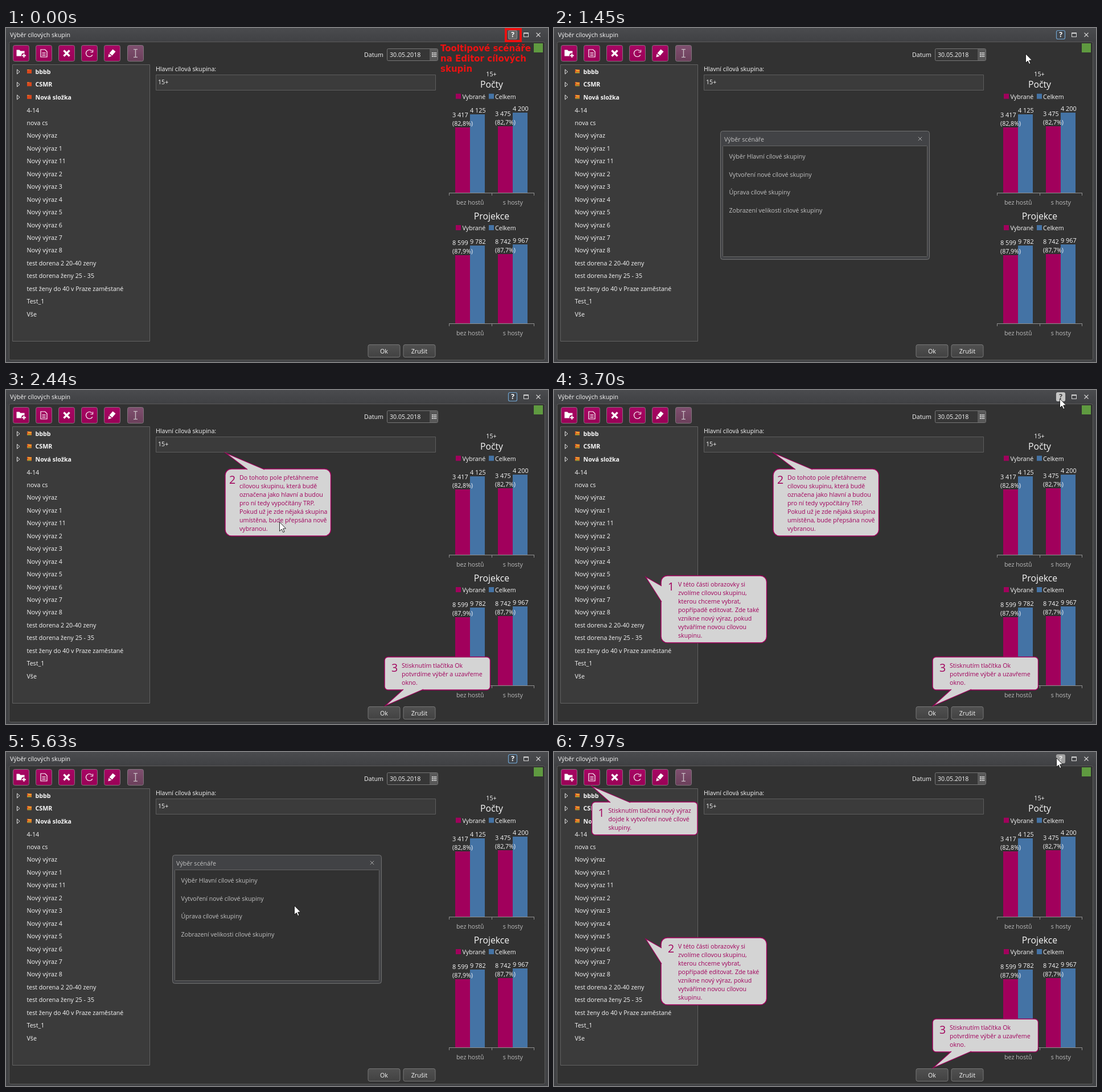
These frames come from a looping animation (952 px wide and 588 px high, 8 s). An HTML page with a canvas:

```html
<!DOCTYPE html>
<html lang="cs">
<head>
<meta charset="utf-8">
<title>Výběr cílových skupin</title>
<style>
html, body { margin: 0; width: 100%; height: 100%; overflow: hidden; background: #323232; }
canvas { display: block; width: 952px; height: 588px; }
</style>
</head>
<body>
<canvas id="stage" width="952" height="588"></canvas>
<script>
const ctx = document.getElementById('stage').getContext('2d');
const LOOP = 8000, STEP = 77;
const PINK = '#a1005c', BLUE = '#4473a5', RED = '#ed1111', TEXT = '#f8f8f8', DIM = '#c2c2c2';
const SANS = '"Open Sans", "Noto Sans", sans-serif';
const BODY = 10.65;

const clamp = v => Math.max(0, Math.min(1, v));

function text(str, x, y, { size = BODY, color = TEXT, weight = 400, align = 'left', family = SANS } = {}) {
  ctx.font = `${weight} ${size}px ${family}`;
  ctx.fillStyle = color;
  ctx.textAlign = align;
  ctx.fillText(str, x, Math.round(y + size * 0.36));
}

function rect(x, y, w, h, color) {
  ctx.fillStyle = color;
  ctx.fillRect(x, y, w, h);
}

function box(x, y, w, h, r, fill, stroke, width = 1) {
  ctx.beginPath();
  ctx.roundRect(x, y, w, h, r);
  if (fill) { ctx.fillStyle = fill; ctx.fill(); }
  if (stroke) { ctx.strokeStyle = stroke; ctx.lineWidth = width; ctx.stroke(); }
}

function path(points, { stroke, fill, width = 1, close = false }) {
  ctx.beginPath();
  points.forEach(([x, y]) => ctx.lineTo(x, y));
  if (close) ctx.closePath();
  if (fill) { ctx.fillStyle = fill; ctx.fill(); }
  if (stroke) { ctx.strokeStyle = stroke; ctx.lineWidth = width; ctx.stroke(); }
}

function shade(y, h, top, bottom) {
  const g = ctx.createLinearGradient(0, y, 0, y + h);
  g.addColorStop(0, top);
  g.addColorStop(1, bottom);
  return g;
}

function cross(x, y, r, color, width) {
  path([[x - r, y - r], [x + r, y + r]], { stroke: color, width });
  path([[x - r, y + r], [x + r, y - r]], { stroke: color, width });
}

// Toolbar icons, drawn around the button centre
const icons = [
  () => {
    path([[-8, -6], [-3, -6], [-1, -4], [6, -4], [6, 5], [-8, 5]], { fill: '#fff', close: true });
    ctx.beginPath();
    ctx.arc(5, 4, 4.6, 0, 7);
    ctx.fillStyle = PINK;
    ctx.fill();
    rect(1.5, 3, 7, 2, '#fff');
    rect(4, 0.5, 2, 7, '#fff');
  },
  () => {
    path([[-5.5, -6.5], [2, -6.5], [5.5, -3], [5.5, 6.5], [-5.5, 6.5]], { stroke: '#fff', width: 1.2, close: true });
    [-1.5, 1, 3.5].forEach(y => rect(-3, y, 6, 1, '#fff'));
  },
  () => cross(0, 0, 5, '#fff', 3.4),
  () => {
    ctx.beginPath();
    ctx.arc(0, 0, 6, 0.5, 5.5);
    ctx.strokeStyle = '#fff';
    ctx.lineWidth = 1.2;
    ctx.stroke();
    path([[6, -6], [6, -2], [2, -2]], { stroke: '#fff', width: 1.2 });
  },
  () => {
    path([[1, -7], [6, -3], [0, 4], [-5, 0]], { fill: '#fff', close: true });
    path([[-6, 1], [-1, 5], [-7, 7]], { fill: '#fff', close: true });
  },
  () => {
    rect(-0.7, -7, 1.4, 14, '#c9bdc4');
    rect(-3.5, -7.5, 7, 1.2, '#c9bdc4');
    rect(-3.5, 6.3, 7, 1.2, '#c9bdc4');
  }
];

function toolbar() {
  icons.forEach((icon, i) => {
    const x = Math.round(11.5 + i * 40.2) + 0.5, off = i === 5;
    box(x, 30.5, 28, 28, 3, off ? shade(30, 28, '#805070', '#6b405b') : shade(30, 28, '#a80664', '#9a0057'),
      off ? '#82767e' : '#8b7080');
    ctx.save();
    ctx.translate(x + 14, 44.5);
    icon();
    ctx.restore();
  });
}

const folders = ['bbbb', 'CSMR', 'Nová složka'];
const items = ['4-14', 'nova cs', 'Nový výraz',
  ...[1, 11, 2, 3, 4, 5, 6, 7, 8].map(n => 'Nový výraz ' + n),
  'test dorena 2 20-40 zeny', 'test dorena ženy 25 - 35',
  'test ženy do 40 v Praze zaměstané', 'Test_1', 'Vše'];

function tree(intro) {
  box(11.5, 64.5, 241, 487, 0, '#3b3b3b', '#626262');
  folders.forEach((name, i) => {
    const y = 77 + i * 22.45;
    path([[19.5, y - 4], [24, y], [19.5, y + 4]], { stroke: '#e4e4e4', close: true });
    rect(37, y - 4, 8, 7, '#d9481c');
    rect(37, y - 4, 4, 1, '#f08a38');
    if (!intro) {
      rect(39, y - 3, 6, 1.5, '#f4cf3f');
      rect(37, y, 8, 1, '#e8b830');
      rect(38, y + 1.5, 6, 1.5, '#6f9a3a');
    }
    text(name, 51.5, y, { weight: 700 });
  });
  items.forEach((name, i) => text(name, 36.5, 144.7 + i * 22.45));
}

function button(label, x) {
  box(x + 0.5, 557.5, 56, 22, 3, shade(558, 22, '#505050', '#424242'), '#777');
  text(label, x + 28.5, 569, { align: 'center' });
}

// Each group: bar left edge, two bar tops, selected count, share, total, label
function chart(title, titleY, axisY, groups) {
  text(title, 853, titleY, { size: 15.8, align: 'center' });
  const legendY = titleY + 21;
  rect(790, legendY - 5, 9, 9, PINK);
  text('Vybrané', 801.5, legendY);
  rect(848, legendY - 5, 9, 9, BLUE);
  text('Celkem', 859, legendY);
  groups.forEach(g => {
    rect(g.x, g.top, 26, axisY - g.top, PINK);
    rect(g.x + 26, g.topAll, 26, axisY - g.topAll, BLUE);
    text(g.count, g.x - 5, g.top - 22.3, { size: 10.9 });
    text(g.share, g.x - 5, g.top - 7.3);
    text(g.total, g.x + 26, g.topAll - 6.8, { size: 10.9 });
    text(g.label, g.x + 26.3, axisY + 17, { color: '#bcbcbc', align: 'center' });
  });
  rect(778, axisY, 150, 1, '#909090');
  [778, 853, 927].forEach(x => rect(x, axisY, 1, 5, '#909090'));
}

function charts() {
  text('15+', 852.5, 81, { align: 'center' });
  chart('Počty', 99.7, 290, [
    { x: 789, top: 175, topAll: 152, count: '3 417', share: '(82,8%)', total: '4 125', label: 'bez hostů' },
    { x: 864, top: 173, topAll: 149, count: '3 475', share: '(82,7%)', total: '4 200', label: 's hosty' }]);
  chart('Projekce', 331, 520, [
    { x: 789, top: 400, topAll: 383, count: '8 599', share: '(87,9%)', total: '9 782', label: 'bez hostů' },
    { x: 864, top: 398, topAll: 381, count: '8 742', share: '(87,7%)', total: '9 967', label: 's hosty' }]);
}

const helpStyles = {
  normal: ['#666', '#888', '#fff'],
  focus: ['#41454b', '#6fa3cf', '#fff'],
  active: ['#dedede', '#dedede', PINK],
  hover: ['#a2a2a2', '#a2a2a2', '#e9e9e9'],
  pressed: ['#c6c6c6', '#c6c6c6', '#3c3c3c']
};
const helpStates = [[0, 'normal'], [770, 'hover'], [1300, 'focus'], [2515, 'active'], [3480, 'pressed'],
  [4545, 'focus'], [6165, 'active'], [7965, 'hover']];

function helpButton(t) {
  const [fill, stroke, mark] = helpStyles[helpStates.findLast(s => t >= s[0])[1]];
  box(882.5, 4.5, 15, 15, 2.5, fill, stroke, 1.2);
  text('?', 890, 11.8, { size: 12, weight: 700, color: mark, align: 'center' });
}

function windowFrame(t) {
  rect(0, 0, 952, 588, '#414245');
  rect(0, 0, 952, 24, shade(0, 24, '#4a4b4e', '#404144'));
  box(5.5, 24.5, 941, 560, 3, '#323232', '#5b5b5b');
  text('Výběr cílových skupin', 7, 12);
  helpButton(t);
  ctx.strokeStyle = '#d6d6d6';
  ctx.lineWidth = 1;
  ctx.strokeRect(909.5, 8.5, 8, 7);
  rect(909, 8, 9, 2, '#d6d6d6');
  cross(935, 12, 3.5, '#d6d6d6', 1.1);
  rect(927, 27, 16, 16, '#5f9a40');
}

function form() {
  text('Datum', 629, 47);
  box(669.5, 36.5, 89, 21, 2, '#363636', '#777');
  text('30.05.2018', 674, 47);
  rect(744, 37, 14, 20, '#585858');
  for (let i = 0; i < 9; i++) rect(748 + i % 3 * 3, 43 + Math.floor(i / 3) * 3, 2, 2, '#ddd');
  text('Hlavní cílová skupina:', 263, 72);
  box(263.5, 82.5, 491, 27, 0, '#3b3b3b', '#5e5e5e');
  text('15+', 267, 95.5);
  button('Ok', 635.5);
  button('Zrušit', 697.5);
}

const scenarios = ['Výběr Hlavní cílové skupiny', 'Vytvoření nové cílové skupiny',
  'Úprava cílové skupiny', 'Zobrazení velikosti cílové skupiny'];

function dialog(p) {
  if (p <= 0) return;
  const scale = 0.93 + 0.07 * p;
  ctx.save();
  ctx.globalAlpha = p;
  ctx.translate(476, 294.5);
  ctx.scale(scale, scale);
  ctx.translate(-476, -294.5);
  box(292.5, 181.5, 367, 226, 4, '#424346', '#737373');
  box(296.5, 207.5, 359, 195, 1, '#323232', '#666');
  text('Výběr scénáře', 299, 196, { color: DIM });
  cross(643, 195, 3.2, '#aaa', 1);
  scenarios.forEach((s, i) => text(s, 307.5, 226 + i * 31.7, { color: DIM }));
  ctx.restore();
}

// tail: base start, tip, base end
const listNote = { x: 188, y: 327, h: 118, pad: 30, tail: [[189, 373], [161, 329], [189, 345]],
  lines: ['V této části obrazovky si', 'zvolíme cílovou skupinu,', 'kterou chceme vybrat,',
    'popřípadě editovat. Zde také', 'vznikne nový výraz, pokud', 'vytváříme novou cílovou', 'skupinu.'] };
const fieldNote = { x: 385, y: 139, h: 118, pad: 25, tail: [[424, 140], [386, 111], [454, 140]],
  lines: ['Do tohoto pole přetáhneme', 'cílovou skupinu, která budě', 'označena jako hlavní a budou',
    'pro ní tedy vypočítány TRP.', 'Pokud už je zde nějaká skupina', 'umístěna, bude přepsána nově', 'vybranou.'] };
const okNote = { x: 665, y: 470, h: 58, pad: 30, tail: [[698, 527], [666, 556], [733, 527]],
  lines: ['Stisknutím tlačítka Ok', 'potvrdíme výběr a uzavřeme', 'okno.'] };
const newNote = { x: 66.5, y: 88, h: 58, pad: 29, tail: [[99, 89], [66, 60], [134, 89]],
  lines: ['Stisknutím tlačítka nový výraz', 'dojde k vytvoření nové cílové', 'skupiny.'] };

function callout(note, number, alpha) {
  if (alpha <= 0) return;
  const { x, y, h, pad, tail, lines } = note;
  const r = h > 60 ? 11 : 6;
  ctx.save();
  ctx.globalAlpha = alpha;
  box(x, y, 185.5, h, r, '#d4d4d4', PINK, 1.4);
  path(tail, { fill: '#d4d4d4', stroke: PINK, width: 1.2 });
  text(number, x + pad - 18, y + 19, { size: 19.5, color: PINK });
  lines.forEach((line, i) => text(line, x + pad, y + 15 + i * 15, { color: PINK }));
  ctx.restore();
}

function callouts(t) {
  const fade = 1 - clamp((t - 3740) / 690);
  const show = (note, number, from, to, alpha = 1) => t >= from && t < to && callout(note, number, alpha);
  show(fieldNote, '2', 2285, 4470, fade);
  show(okNote, '3', 2365, 4470, fade);
  show(listNote, '1', 2515, 4470, fade);
  show(newNote, '1', 6010, LOOP);
  show(okNote, '3', 6085, LOOP);
  show(listNote, '2', 6165, LOOP);
}

function introNote() {
  ctx.strokeStyle = RED;
  ctx.lineWidth = 4;
  ctx.strokeRect(878, 2, 26, 21);
  ['Tooltipové scénáře', 'na Editor cílových', 'skupin'].forEach((line, i) =>
    text(line, 763, 36 + i * 18, { size: 15, weight: 700, color: RED, family: '"DejaVu Sans", sans-serif' }));
}

// Pointer keys: time, x, y
const keys = [[70, 700, 330], [450, 800, 150], [840, 890, 15], [1070, 890, 15], [1300, 878, 20], [1450, 828, 45],
  [1760, 480, 232], [2870, 480, 232], [3200, 690, 120], [3550, 888, 15], [4470, 888, 15], [4620, 869, 20],
  [4800, 869, 20], [4940, 857, 25], [5200, 740, 105], [5560, 506, 270], [6570, 506, 270],
  [6880, 700, 130], [7190, 880, 11], [7640, 881, 11], [7970, 882, 10]];

function pointer(t) {
  if (t < keys[0][0]) return;
  const i = keys.findLastIndex(k => t >= k[0]);
  const a = keys[i], b = keys[i + 1] || a;
  const p = a === b ? 0 : Math.floor((t - a[0]) / STEP) * STEP / (b[0] - a[0]);
  ctx.save();
  ctx.translate(Math.round(a[1] + (b[1] - a[1]) * p) + 0.5, Math.round(a[2] + (b[2] - a[2]) * p) + 0.5);
  path([[0, 0], [0, 16], [3.6, 12.5], [6.2, 18], [8.6, 17], [6.1, 11.6], [11, 11.3]],
    { fill: '#fff', stroke: '#111', width: 0.9, close: true });
  ctx.restore();
}

function draw(t) {
  const intro = t < 70;
  windowFrame(t);
  toolbar();
  tree(intro);
  form();
  charts();
  const opening = t < 3000 ? 1140 : 4870, closing = t < 3000 ? 1910 : 5630;
  dialog(Math.min(clamp((t - opening) / 280), 1 - clamp((t - closing) / 260)));
  callouts(t);
  if (intro) introNote();
  pointer(t);
}

const start = performance.now();
function frame() {
  draw((performance.now() - start) % LOOP);
  requestAnimationFrame(frame);
}
frame();
</script>
</body>
</html>
```
